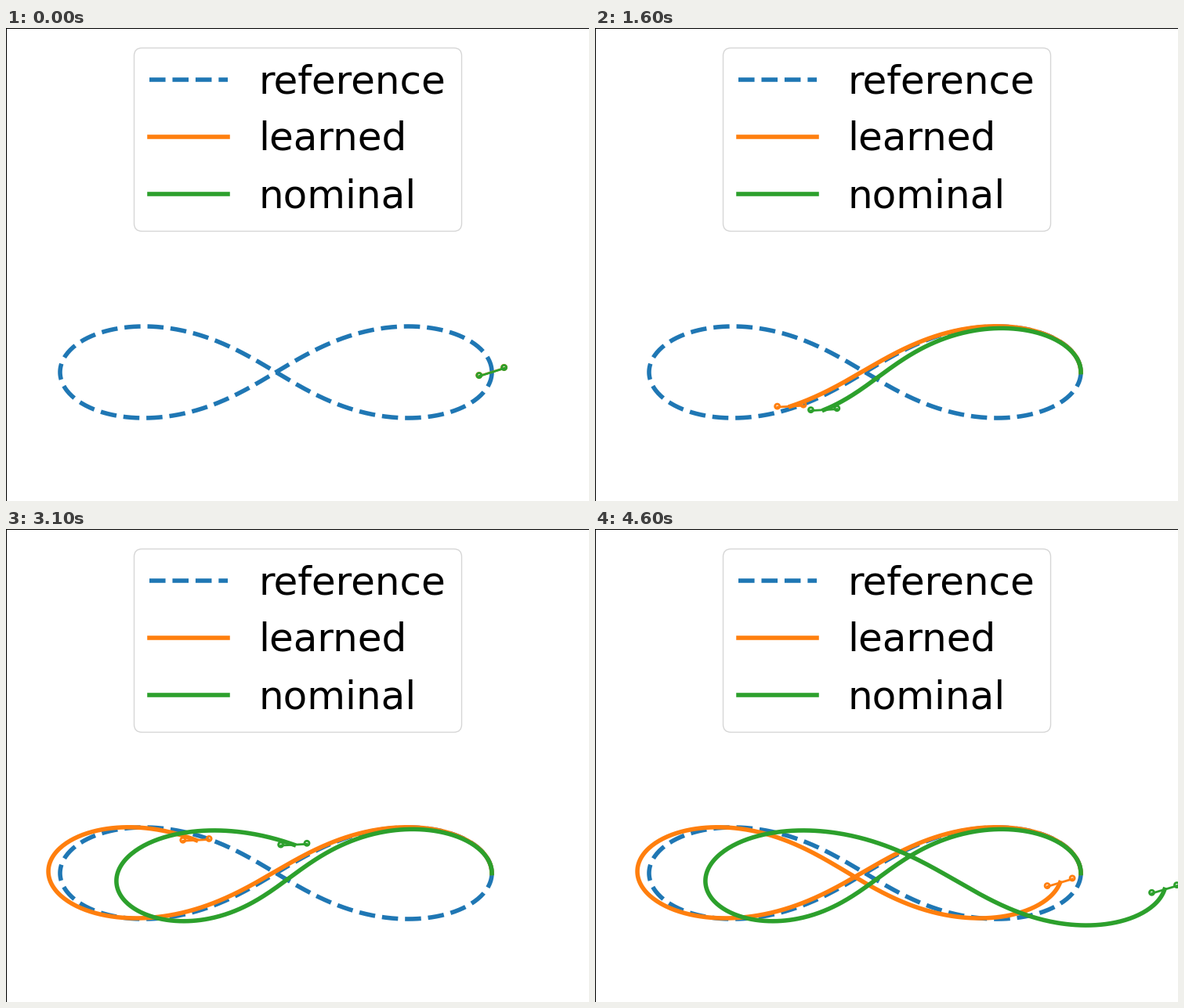
These frames come from a looping animation (744x604 px, 4.7 s). A matplotlib script:

```python
import numpy as np
import matplotlib.pyplot as plt
from matplotlib.animation import FuncAnimation
from matplotlib.patches import Circle

W, H, DPI = 744, 604, 100
FRAMES, INTERVAL = 47, 100
CX, CY, AX, AY = 344.5, 439.5, 275.5, 165.5   # lemniscate centre and scale
PERIOD = 46.56                                # frames per lap
ARM = 16.7                                    # half width of the vehicle


def reference(t):
    a = 2 * np.pi * t / PERIOD
    s, c = np.sin(a), np.cos(a)
    return CX + AX * c / (1 + s * s), CY - AY * s * c / (1 + s * s)


def learned_error(t):
    """Small lag that settles, with a slight lift at each crossing."""
    dx = -24.3 / (1 + np.exp((21.5 - t) / 3.9))
    dy = -1.7 * np.sin(2 * np.pi * (t - 2) / PERIOD) ** 2
    return dx, dy


def nominal_error(t):
    """Drift that grows quadratically, then saturates, while slowly sinking."""
    dx = 0.154 * t ** 2 / (1 + (t / 38.4) ** 3.8)
    dy = 0.175 * t + 2.4 * np.exp(-t / 35) * np.sin(t / 5.3)
    return dx, dy


def tilt(t):
    """Bank angle that produces the horizontal acceleration at time t."""
    u = np.cos(2 * np.pi * t / PERIOD)
    d = 2 - u * u
    acc = (12 * u + 2 * u ** 3) / d ** 3 * (1 - u * u) - u * (2 + u * u) / d ** 2
    return np.arctan(-0.105 * acc)


class Vehicle:
    def __init__(self, ax, label, color, error, z):
        self.error = error
        self.trail, = ax.plot([], [], color=color, lw=4, label=label, zorder=z)
        self.arm, = ax.plot([], [], color=color, lw=2, zorder=z + 0.1)
        self.rotors = [
            ax.add_patch(Circle((0, 0), 3, fill=False, ec=color, lw=2, zorder=z + 0.2))
            for _ in range(2)]

    def update(self, frame):
        t = np.linspace(0, frame, 10 * frame + 1)
        path = np.add(reference(t), self.error(t))
        self.trail.set_data(*path)
        a = tilt(frame)
        side = np.array([np.cos(a), -np.sin(a)])
        up = np.array([-np.sin(a), -np.cos(a)])
        ends = [path[:, -1] - ARM * side, path[:, -1] + ARM * side]
        self.arm.set_data(*np.transpose(ends))
        for rotor, end in zip(self.rotors, ends):
            rotor.set_center(end + up)
        return [self.trail, self.arm, *self.rotors]


fig = plt.figure(figsize=(W / DPI, H / DPI), dpi=DPI, facecolor="white")
ax = fig.add_axes([0, 0, 1, 1])
ax.set(xlim=(0, W), ylim=(H, 0), xticks=[], yticks=[])
ax.spines[["right", "bottom"]].set_visible(False)

ax.plot(*reference(np.linspace(0, PERIOD, 500)), "--", color="C0", lw=4,
        label="reference", zorder=2)
vehicles = [Vehicle(ax, "learned", "C1", learned_error, 3),
            Vehicle(ax, "nominal", "C2", nominal_error, 4)]
ax.legend(loc="upper center", fontsize=36)


def update(frame):
    return [artist for v in vehicles for artist in v.update(frame)]


anim = FuncAnimation(fig, update, frames=FRAMES, interval=INTERVAL,
                     repeat=True, repeat_delay=0)
plt.show()
```
